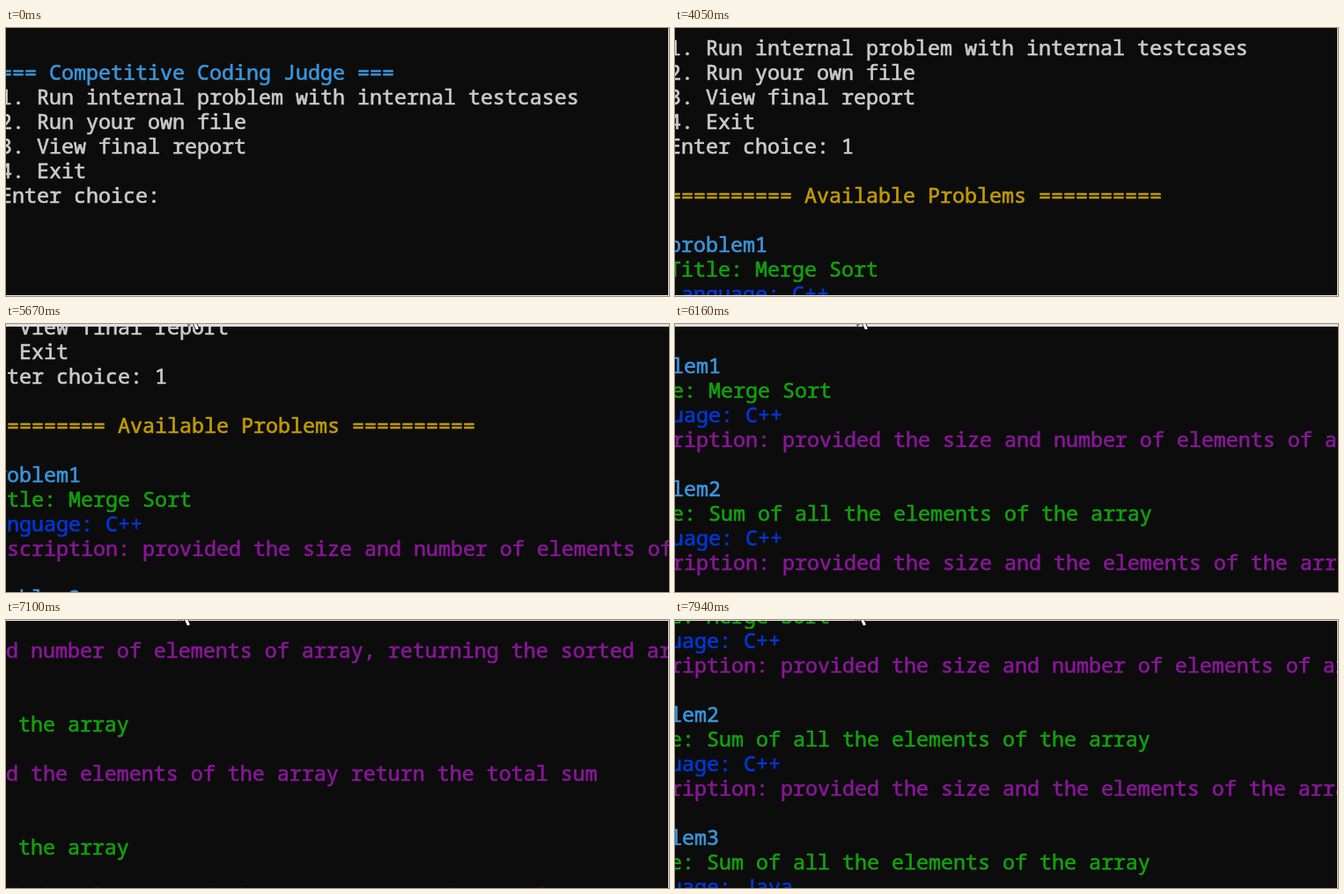
These frames come from a looping animation (753x305 px, 8000 ms). An HTML page:

```html
<!DOCTYPE html>
<html lang="en">
<head>
<meta charset="utf-8">
<title>Terminal judge</title>
<style>
  html, body { margin: 0; width: 100%; height: 100%; overflow: hidden; background: #0c0c0c; }
  svg { display: block; width: 753px; height: 305px; }
  text {
    font: 23.3333px "Noto Sans Mono", "DejaVu Sans Mono", monospace;
    font-variant-ligatures: none;
    white-space: pre;
    fill: currentColor;
    stroke: currentColor;
    stroke-width: .65px;
  }
</style>
</head>
<body>
<svg viewBox="0 0 753 305">
  <rect width="753" height="305" fill="#0c0c0c"/>
  <g id="page">
    <g id="lines"></g>
    <rect id="caret" y="177" width="1" height="28" fill="#fff"/>
  </g>
  <g fill="#e0e0e0">
    <rect id="right" x="752" width="1" height="305"/>
    <rect id="bottom" y="304" width="753" height="1"/>
    <rect id="top" width="753"/>
  </g>
  <path id="mouse" d="M0 0V20.5L4.8 16.2L8.8 25L12.4 23.4L8.6 15H16Z"
        fill="#fff" stroke="#000" stroke-width=".8"/>
</svg>
<script>
const LOOP = 8000, TICK = 68, LEFT = -7, ROW = 28;
const TYPED = 2970, RAN = 3980, PAN = 5540, PAN_REST = 6290;
const WHITE = '#cccccc', CYAN = '#3a96dd', GOLD = '#c19c00',
      GREEN = '#13a10e', BLUE = '#0037da', PURPLE = '#881798';
const el = id => document.getElementById(id);

const problem = (n, title, lang, about) => [
  ['problem' + n, CYAN],
  ['Title: ' + title, GREEN],
  ['Language: ' + lang, BLUE],
  ['Description: provided the size and ' + about, PURPLE],
  ['']
];
const sum = 'Sum of all the elements of the array';
const sumAbout = 'the elements of the array return the total sum';
const menu = [
  ['=== Competitive Coding Judge ===', CYAN],
  ['1. Run internal problem with internal testcases'],
  ['2. Run your own file'],
  ['3. View final report'],
  ['4. Exit'],
  ['Enter choice: ']
];
const output = [
  [''],
  ['========== Available Problems ==========', GOLD],
  [''],
  ...problem(1, 'Merge Sort', 'C++', 'number of elements of array, returning the sorted array'),
  ...problem(2, sum, 'C++', sumAbout),
  ...problem(3, sum, 'Java', sumAbout)
];

const lines = [...menu, ...output].map(([str, color = WHITE], i) => {
  const node = document.createElementNS('http://www.w3.org/2000/svg', 'text');
  node.setAttribute('x', LEFT);
  node.setAttribute('y', 59 + i * ROW);
  node.style.color = color;
  node.textContent = str;
  el('lines').append(node);
  return node;
});
const header = lines[0];
const prompt = lines[menu.length - 1];
const results = lines.slice(menu.length);

const linear = p => p;
const easeIn = p => p * p;
const easeOut = p => 1 - (1 - p) ** 1.5;

// Each move goes on from where the one before it ended
const view = {
  from: [0, 0],
  moves: [
    { start: PAN, end: PAN_REST, to: [-57, -214], ease: easeOut },
    { start: 6490, end: 6760, to: [-66, -238], ease: linear },
    { start: 6830, end: 7100, to: [-455, -296], ease: linear },
    { start: 7300, end: 7940, to: [-55, -279], ease: easeIn }
  ]
};
const pointer = {
  from: [530, 310],
  moves: [
    { start: 390, end: 1160, to: [304, 195], ease: easeOut },
    { start: 1210, end: 1210, to: [300, 195], ease: linear },
    { start: 1540, end: 1610, to: [264, 195], ease: linear },
    { start: 4570, end: 4990, to: [207, -18], ease: linear },
    { start: 6830, end: 7100, to: [197, -18], ease: linear },
    { start: 7300, end: 7940, to: [205, -18], ease: easeIn }
  ]
};

function locate({ from, moves }, t) {
  let at = from;
  for (const { start, end, to, ease } of moves) {
    if (t < start) break;
    const count = Math.round((end - start) / TICK) + 1;
    const step = Math.floor((t - start) / TICK + 0.1) + 1;
    const p = ease(Math.min(1, step / count));
    at = at.map((v, i) => v + (to[i] - v) * p);
  }
  return at.map(Math.round);
}

const show = (node, on) => node.setAttribute('visibility', on ? 'visible' : 'hidden');
const place = (node, x, y) => node.setAttribute('transform', `translate(${x} ${y})`);
const within = (t, a, b) => t >= a && t < b;

function draw(t) {
  const typed = t >= TYPED, ran = t >= RAN, panned = t >= PAN;
  const firstPan = within(t, PAN, PAN_REST);

  prompt.textContent = menu[5][0] + (typed ? '1' : '');
  show(header, !ran);
  results.forEach(node => show(node, ran));
  const [x, y] = locate(view, t);
  place(el('page'), x, y - (ran ? 2 * ROW : 0));

  show(el('caret'), within(t, 1820, 2420) || within(t, TYPED, 3630));
  el('caret').setAttribute('x', typed ? 203 : 189);

  show(el('bottom'), !panned);
  show(el('right'), !firstPan);
  show(el('top'), panned);
  el('top').setAttribute('height', firstPan ? 3 : 1);

  show(el('mouse'), t >= 390 && !within(t, TYPED, 4570));
  place(el('mouse'), ...locate(pointer, t));
}

const begin = performance.now();
function tick() {
  draw((performance.now() - begin) % LOOP);
  requestAnimationFrame(tick);
}
tick();
</script>
</body>
</html>
```
